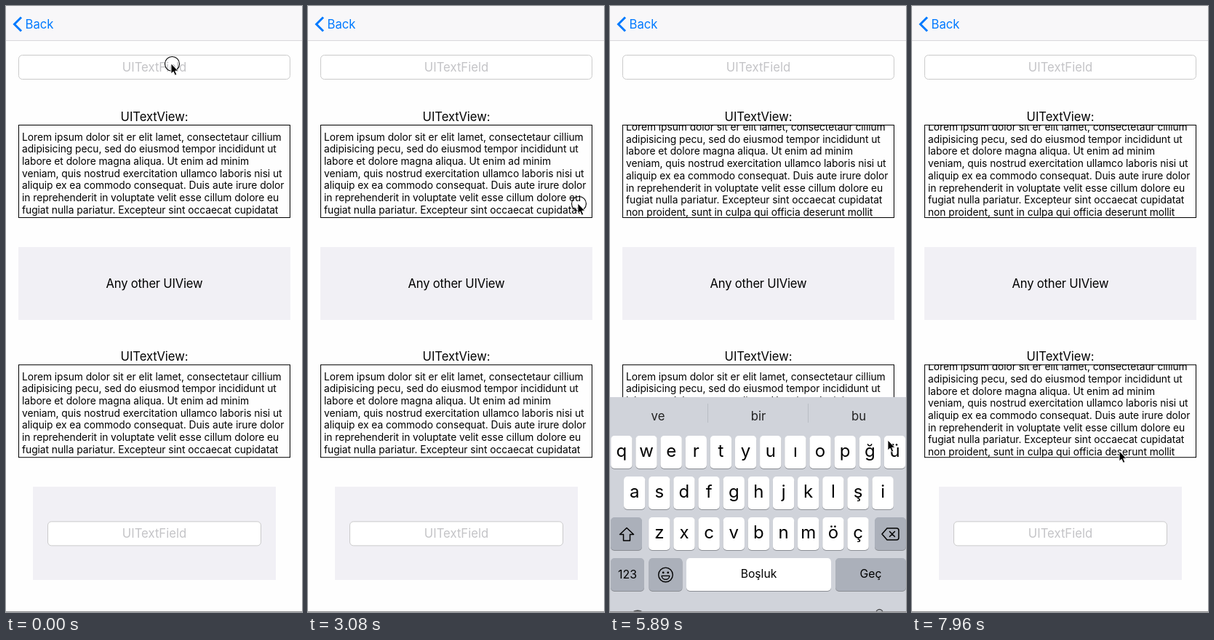
These frames come from a looping animation (407x832 px, 8 s). An HTML page:

```html
<!DOCTYPE html>
<html lang="tr">
<head>
<meta charset="utf-8">
<title>Keyboard avoiding demo</title>
<style>
html, body { margin: 0; width: 100%; height: 100%; overflow: hidden; background: #fefefe; }
svg { display: block; }
text { font-family: Inter, Roboto, sans-serif; white-space: pre; }
</style>
</head>
<body>
<svg id="stage" width="407" height="832" viewBox="0 0 407 832"></svg>
<script>
const LOOP = 8000, STEP = 147.4, KB_HEIGHT = 320, SCROLL = 278, INNER = 13.5;
const LOREM = [
  'Lorem ipsum dolor sit er elit lamet, consectetaur cillium',
  'adipisicing pecu, sed do eiusmod tempor incididunt ut',
  'labore et dolore magna aliqua. Ut enim ad minim',
  'veniam, quis nostrud exercitation ullamco laboris nisi ut',
  'aliquip ex ea commodo consequat. Duis aute irure dolor',
  'in reprehenderit in voluptate velit esse cillum dolore eu',
  'fugiat nulla pariatur. Excepteur sint occaecat cupidatat',
  'non proident, sunt in culpa qui officia deserunt mollit'
];

// Markup helpers
const text = (x, y, size, str, { anchor = 'middle', fill = '#000', gap = 0 } = {}) =>
  `<text x="${x}" y="${y}" font-size="${size}" text-anchor="${anchor}" fill="${fill}" letter-spacing="${gap}">${str}</text>`;
const rect = (x, y, w, h, fill, more = '') =>
  `<rect x="${x}" y="${y}" width="${w}" height="${h}" fill="${fill}" ${more}/>`;
const line = (d, width = 1.5) =>
  `<path d="${d}" fill="none" stroke="#000" stroke-width="${width}" stroke-linejoin="round" stroke-linecap="round"/>`;
const caret = (id, x, y, h) => rect(x, y, 2, h, '#3f6bea', `id="${id}" rx="1"`);

const field = (x, y, w) =>
  rect(x + .5, y + .5, w - 1, 33, '#fff', 'rx="5" stroke="#cacaca"') +
  text(204, y + 23, 16.7, 'UITextField', { fill: '#c4c4c7' });

const textView = (y, n) =>
  text(204, y - 5, 16.6, 'UITextView:', { gap: -.05 }) +
  `<svg x="17" y="${y}" width="374" height="127.5"><g id="inner${n}">` +
  LOREM.map((s, i) => text(5, 21.5 + i * 16.7, 13.8, s, { anchor: 'start', gap: -.05 })).join('') +
  caret('caret' + n, 360, 106.5, 16.5) + '</g></svg>' +
  rect(17.5, y + .5, 373, 127, 'none', 'stroke="#000"');

const key = (x, y, w, fill = '#fff') =>
  rect(x, y + 1, w, 45, '#8b8e94', 'rx="5"') + rect(x, y, w, 45, fill, 'rx="5"');
const keyRow = (x, y, letters) => [...letters].map((c, i) =>
  key(x + i * 34.15, y, 29.3) + text(x + i * 34.15 + 14.65, y + 29.5, 24, c)).join('');

const GREY = '#abb0ba', PANEL = '#f1f0f5';
const keyboard =
  rect(0, 0, 407, KB_HEIGHT, '#d0d3da') +
  rect(134, 9, 1, 26, '#b9bdc4') + rect(272, 9, 1, 26, '#b9bdc4') +
  '<g id="words">' + ['ve', 'bir', 'bu'].map((s, i) => text(66 + i * 138, 32, 16.7, s, { fill: '#222' })).join('') + '</g>' +
  keyRow(1.2, 53, 'qwertyuıopğü') + keyRow(19, 109, 'asdfghjklşi') + keyRow(53.2, 165, 'zxcvbnmöç') +
  key(1, 165, 43, GREY) + key(364, 165, 43, GREY) +
  key(1, 221, 46, GREY) + key(53.5, 221, 46, GREY) + key(105, 221, 199) + key(310, 221, 97, GREY) +
  line('M23 179.5L32.5 188.500H27.5V197H18.5V188.500H13.5Z') +
  line('M381 180H394Q397 180 397 183V193Q397 196 394 196H381L374 188ZM384.5 184.5L391.5 191.5M391.5 184.5L384.5 191.5') +
  text(24, 249, 15.8, '123') + text(204.5, 248, 15.7, 'Boşluk') + text(358.5, 248, 15.7, 'Geç') +
  '<circle cx="76.5" cy="244" r="9.800" fill="none" stroke="#000" stroke-width="1.4"/>' +
  '<circle cx="73.2" cy="241" r="1.4"/><circle cx="79.800" cy="241" r="1.4"/>' +
  line('M71 245.5H82Q81 250.500 76.5 250.500T71 245.5Z', 1.2) +
  '<g opacity=".65">' +
  line('M26 305a12 12 0 1 0 24 0a12 12 0 1 0 -24 0ZM32 305a6 12 0 1 0 12 0a6 12 0 1 0 -12 0ZM38 293V317M26 305H50M29 298.5Q38 303 47 298.5M29 311.5Q38 307 47 311.5', 1.4) +
  line('M366 296a4.5 4.5 0 0 1 9 0V305a4.5 4.5 0 0 1 -9 0ZM361.5 301V305a9 9 0 0 0 18 0V301M370.5 314V317.5M365 317.5H376', 1.4) +
  '</g>';

const $ = id => document.getElementById(id);
$('stage').innerHTML =
  rect(0, 0, 407, 832, '#fefefe') +
  '<g id="content">' +
  field(17, 67, 374) + caret('caret0', 203, 72, 24) +
  textView(163, 1) +
  rect(17, 331, 374, 100, PANEL) + text(204, 387, 16.6, 'Any other UIView', { gap: -.2 }) +
  textView(492.2, 2) +
  rect(37, 660, 334, 128, PANEL) + field(57, 707.4, 294) +
  '</g>' +
  rect(0, 0, 407, 47, '#f8f7f9') + rect(0, 47, 407, 1, '#d9d8dc') +
  '<path d="M21 15.5L11.5 25L21 34.5" fill="none" stroke="#007aff" stroke-width="3"/>' +
  text(26.5, 31, 16.7, 'Back', { anchor: 'start', fill: '#007aff' }) +
  `<g id="keyboard">${keyboard}</g>` +
  rect(0, 831, 407, 1, '#8e8e90') +
  '<g id="pointer"><circle id="ring" cx="1.5" cy=".5" r="10" fill="none" stroke="#000" stroke-width="1.1"/>' +
  '<path d="M0 0V14L3.2 11.2L5.4 16.2L7.8 15.2L5.6 10.2H9.8Z" stroke="#fff" stroke-width=".9"/></g>';

// Each session: keyboard shown at, hidden at
const SESSIONS = [[400, 2324.5], [3120, 3860], [5666, 7112]];
const TAPS = [[0, 130], [2200, 2380], [2950, 3130], [3800, 3900], [5520, 5740], [7000, 7150]];
const PATH = [
  [0, 227, 79], [500, 227, 79], [1470, 345, 290], [1700, 345, 290], [2060, 361, 317],
  [2500, 361, 317], [2920, 371, 271], [3560, 371, 271], [3850, 328, 353], [4300, 328, 353],
  [5400, 382, 596], [6250, 382, 596], [6750, 370, 472], [7230, 370, 472], [7950, 285, 611], [8100, 285, 611]
];

const clamp = x => Math.min(1, Math.max(0, x));
const smooth = x => (x = clamp(x), x * x * (3 - 2 * x));
const scrolled = (t, start) => smooth((t - start) / 350);
// Critically damped spring used for the keyboard slide
const spring = ms => {
  const a = Math.max(0, ms) * .01826, v = 1 - (1 + a) * Math.exp(-a);
  return v > .99 ? 1 : v;
};

function pointerAt(t) {
  const i = Math.max(1, PATH.findIndex(p => p[0] > t));
  const [t0, x0, y0] = PATH[i - 1], [t1, x1, y1] = PATH[i];
  const k = smooth((t - t0) / (t1 - t0));
  return [x0 + (x1 - x0) * k, y0 + (y1 - y0) * k];
}

const move = (id, x, y) => $(id).setAttribute('transform', `translate(${x} ${y})`);
const show = (id, on) => $(id).setAttribute('visibility', on ? 'visible' : 'hidden');

function draw(t) {
  let up = 0;
  SESSIONS.forEach(([on, off], i) => {
    up += spring(t - on) - spring(t - off);
    show('caret' + i, t >= on && t < off && (t - on) % 1000 < 500);
  });
  move('keyboard', 0, 832 - KB_HEIGHT * up);
  show('words', t > 2900);
  move('content', 0, -SCROLL * (scrolled(t, 6165) - scrolled(t, 7593)));
  move('inner1', 0, -INNER * scrolled(t, 3600));
  move('inner2', 0, -INNER * scrolled(t, 6165));
  move('pointer', ...pointerAt(t));
  show('ring', TAPS.some(([a, b]) => t >= a && t < b));
}

const origin = performance.now();
function tick() {
  const t = (performance.now() - origin) % LOOP;
  draw(Math.floor((t + 15) / STEP) * STEP); // held steps, as in a screen capture
  requestAnimationFrame(tick);
}
tick();
</script>
</body>
</html>
```
